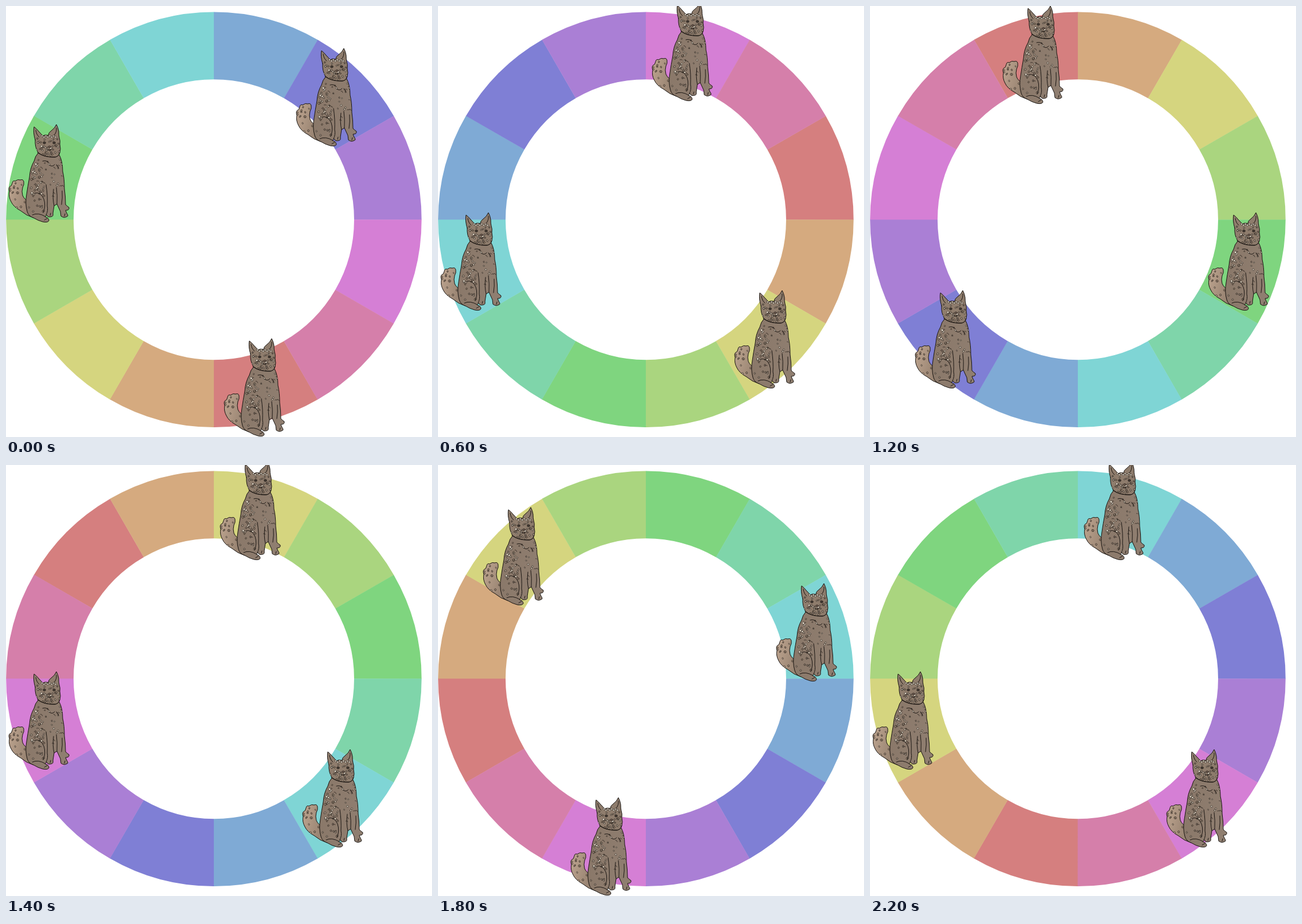
Write an HTML page with a canvas that moves like this. It is 744 by 753 pixels and loops after 2.4 s.

```html
<!DOCTYPE html>
<html lang="en">
<head>
<meta charset="utf-8">
<title>Colour wheel</title>
<style>
html, body { margin: 0; width: 100%; height: 100%; overflow: hidden; background: #fff; }
canvas { display: block; }
</style>
</head>
<body>
<canvas id="stage" width="744" height="753"></canvas>
<script>
const ctx = document.getElementById('stage').getContext('2d');
const STEP = 200, COUNT = 12, SLICE = Math.PI / 6;
const CX = 363, CY = 373.3, OUTER = 362.8, INNER = 245;

// Seats of the three cats, top left corner, for each of four poses
const SEATS = [
  [[506, 74], [4, 207], [380, 581]],
  [[590, 207], [78, 74], [231, 581]],
  [[590, 361], [231, 0], [78, 497]],
  [[517, 497], [373, -5], [4, 361]]
];

const TAIL = new Path2D(`M7 102 Q8 97 12 99 Q17 95 21 97 Q26 95 27 100
  Q28 105 25 110 Q23 117 25 124 Q28 131 36 135 L44 163 Q31 159 22 151
  Q9 144 5 135 Q0 126 2 117 Q-1 109 5 107 Z`);

const BODY = new Path2D(`M52 50 Q47 55 45 64 Q38 76 37 92 Q34 108 32 122
  Q29 138 33 152 Q35 160 44 163 Q52 168 60 170 Q69 172 71 168
  Q71 163 64 161 L67 158 Q69 163 75 161 Q79 161 78 155 L80 142 L85 139
  L91 152 L92 160 Q97 164 102 161 Q106 160 102 155 L100 150
  Q107 150 106 145 Q102 142 100 140 Q100 126 98 112
  Q98 94 95 82 Q95 64 89 53 Z`);

const HEAD = new Path2D(`M47 27 Q43 14 45 4 Q50 8 53 12 Q58 17 60 20
  Q64 17 70 19 Q70 14 75 11 Q81 7 84 0 Q87 5 88 12 Q88 19 89 23
  Q91 28 90 35 Q92 43 90 49 Q88 57 80 57 Q62 57 52 49 Q46 39 47 27 Z`);

const LINES = new Path2D(`M51 49 Q62 58 82 57 Q88 56 90 49
  M66 105 Q69 125 68 142 Q70 151 66 158 M79 113 Q77 130 80 142
  M85 139 Q86 124 84 110 M94 116 Q95 128 93 140
  M46 120 Q56 117 62 130 Q66 142 61 154 M42 158 Q52 153 65 161
  M63 167 l5 -3 M98 160 l1 -4 M73 159 l1 -4
  M60 64 q7 -2 11 3 M72 71 q5 4 9 -1 M84 70 q4 3 4 7
  M48 10 Q49 18 54 22 M84 6 Q85 13 80 19
  M68 43 Q72 47 76 42`);

function seeded(seed) {
  return () => (seed = (seed * 16807) % 2147483647) / 2147483647;
}

function paint(g, path, from, to, x0, x1) {
  const fill = g.createLinearGradient(x0, 100, x1, 110);
  fill.addColorStop(0, from);
  fill.addColorStop(1, to);
  g.fillStyle = fill;
  g.fill(path);
  g.strokeStyle = '#15110e';
  g.lineWidth = 1;
  g.stroke(path);
}

function spot(g, x, y, rx, ry, turn, color) {
  g.beginPath();
  g.ellipse(x, y, rx, ry, turn, 0, 2 * Math.PI);
  g.fillStyle = color;
  g.fill();
  g.stroke();
}

function spots(g, path, n, box, size, colors, rand) {
  const [x, y, w, h] = box;
  g.save();
  g.clip(path);
  g.strokeStyle = '#2a231e';
  g.lineWidth = 0.7;
  for (let i = 0; i < n; i++) {
    const r = size * (0.7 + 0.5 * rand());
    spot(g, x + w * rand(), y + h * rand(), r, r * (0.7 + 0.4 * rand()),
      3 * rand(), colors[Math.floor(rand() * colors.length)]);
  }
  g.restore();
}

function flecks(g, n, rand) {
  g.save();
  g.clip(BODY);
  g.strokeStyle = '#2a231e';
  g.lineWidth = 0.8;
  for (let i = 0; i < n; i++) {
    const x = 38 + 56 * rand(), y = 62 + 70 * rand();
    g.beginPath();
    g.moveTo(x, y);
    g.quadraticCurveTo(x + 2, y + 3 * rand() - 2, x + 2 + 2 * rand(), y + 3 * rand());
    g.stroke();
  }
  g.restore();
}

function makeCat() {
  const cat = document.createElement('canvas');
  cat.width = 112;
  cat.height = 178;
  const g = cat.getContext('2d');
  const rand = seeded(731);
  const fur = ['#93816f', '#85766a', '#a8998a'];
  const pale = ['#d2c6b5', '#ad9e8e', '#968574', '#e6dccc'];
  g.translate(2, 2);
  g.lineCap = g.lineJoin = 'round';

  paint(g, TAIL, '#bda48f', '#9a8573', 2, 40);
  spots(g, TAIL, 26, [3, 98, 36, 58], 1.6, ['#ac9581', '#a18b79', '#c6b19c'], rand);
  paint(g, BODY, '#8a7869', '#8f7e70', 32, 100);
  spots(g, BODY, 38, [40, 60, 22, 62], 1.7, pale, rand);
  spots(g, BODY, 16, [62, 60, 34, 52], 1.4, pale, rand);
  spots(g, BODY, 14, [34, 118, 32, 36], 1.7, fur, rand);
  flecks(g, 20, rand);

  paint(g, HEAD, '#8f7d6d', '#8a796a', 48, 90);
  spots(g, HEAD, 46, [49, 23, 40, 31], 1.6, pale.concat(fur), rand);
  g.strokeStyle = '#2a231e';
  g.lineWidth = 0.7;
  for (let i = 0; i < 8; i++) {
    spot(g, 59 + i * 3.4, 20 + (i % 2) * 2, 1.7, 1.5, 0, '#efe7d8');
  }
  for (const x of [63, 80]) spot(g, x, 32, 2.4, 2.1, 0, '#3f3731');
  spot(g, 72, 39, 2.4, 1.6, 0, '#6b5a50');
  g.strokeStyle = '#191411';
  g.lineWidth = 1;
  g.stroke(LINES);
  return cat;
}

const cat = makeCat();

function drawWheel(step) {
  for (let i = 0; i < COUNT; i++) {
    const start = (i + 2 - step) * SLICE;
    const end = start + SLICE;
    ctx.beginPath();
    ctx.arc(CX, CY, OUTER, start, end + 0.001);
    ctx.arc(CX, CY, INNER, end + 0.001, start, true);
    ctx.closePath();
    ctx.fillStyle = `hsl(${i * 30}, 50.6%, 66.6%)`;
    ctx.fill();
  }
}

function frame(now) {
  const step = Math.floor(now / STEP) % COUNT;
  ctx.fillStyle = '#fff';
  ctx.fillRect(0, 0, 744, 753);
  drawWheel(step);
  for (const [x, y] of SEATS[step % SEATS.length]) ctx.drawImage(cat, x - 2, y - 2);
}

let origin;
function tick(now) {
  if (origin === undefined) origin = now;
  frame(Math.max(0, now - origin));
  requestAnimationFrame(tick);
}
frame(0);
requestAnimationFrame(tick);
</script>
</body>
</html>
```
